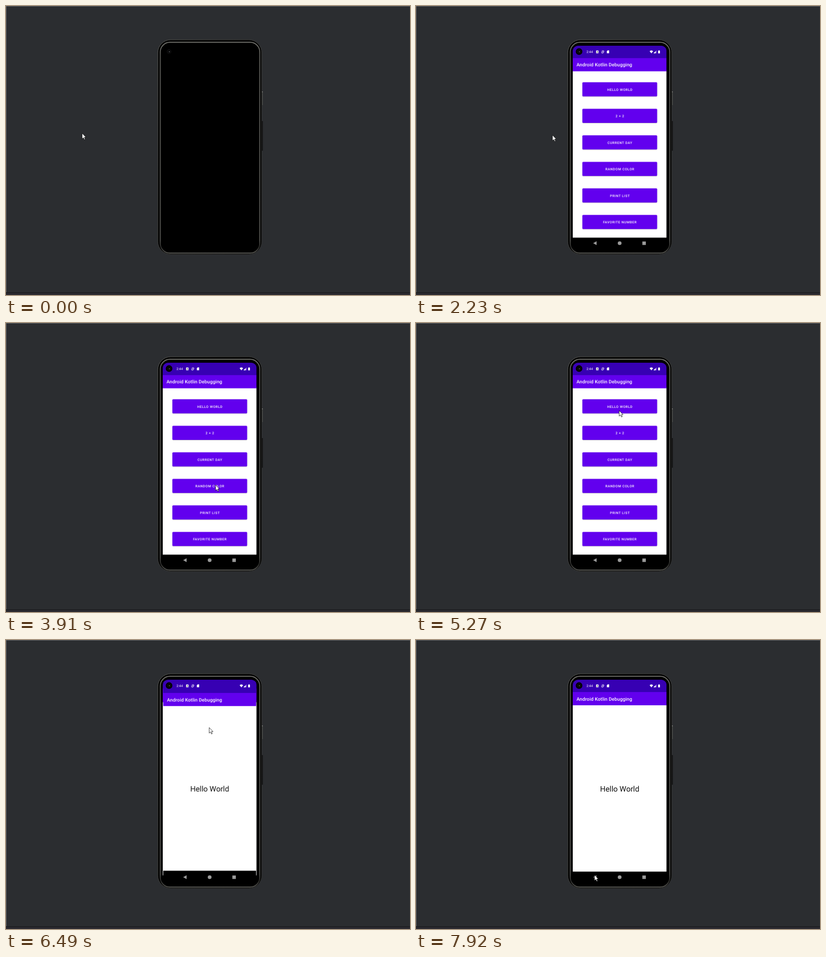
Recreate the animation shown at these times as an HTML page. Size 884 by 633 pixels, loop 8000 ms.

```html
<!DOCTYPE html>
<html lang="en">
<head>
<meta charset="utf-8">
<title>Phone demo</title>
<style>
  html, body { margin: 0; width: 100%; height: 100%; overflow: hidden; background: #2b2d30; }
  svg { display: block; width: 884px; height: 633px; font-family: Roboto, sans-serif; text-rendering: geometricPrecision; }
  .bars, .menu, .hello, .press, .cursor { animation: 8s step-end infinite; }
  .menu, .hello { transform-origin: 445.5px 309px; }
  .title { font-size: 10.43px; font-weight: 500; letter-spacing: .13px; fill: #fff; }
  .label { font-size: 7.3px; font-weight: 500; letter-spacing: .65px; fill: #fff; text-anchor: middle; }

  .bars { animation-name: bars; }
  @keyframes bars { 0% { opacity: 0 } 21%, 100% { opacity: 1 } }

  .menu { animation-name: menu; }
  @keyframes menu {
    0% { opacity: 0; transform: none }
    27.875% { opacity: 1; transform: none }
    76.25% { opacity: 1; transform: scale(1.001) }
    77.875% { opacity: 1; transform: scale(1.002) }
    79.375% { opacity: 1; transform: scale(1.004) }
    81.125% { opacity: 1; transform: scale(1.041) }
    82.625%, 100% { opacity: 0; transform: none }
  }

  .hello { animation-name: hello; }
  @keyframes hello {
    0% { opacity: 0; transform: none }
    81.125% { opacity: 1; transform: scale(.99) }
    82.625% { opacity: 1; transform: scale(.998) }
    84.5%, 100% { opacity: 1; transform: none }
  }

  .press { animation-name: press; }
  @keyframes press { 0% { opacity: 0 } 70.875% { opacity: .2 } 76.25%, 100% { opacity: 0 } }

  .cursor { animation-name: move; }
  @keyframes move {
    0% { transform: translate(166px, 278px); opacity: 1 }
    1.875% { transform: translate(66px, 84px); opacity: 0 }
    24.5% { transform: translate(66px, 84px); opacity: 1 }
    26% { transform: translate(298px, 282px) }
    29.375% { transform: translate(428px, 302px) }
    31% { transform: translate(516px, 305px) }
    34.375% { transform: translate(508px, 262px) }
    35.875% { transform: translate(484px, 176px) }
    37.375% { transform: translate(458px, 100px) }
    39% { transform: translate(449px, 138px) }
    40.5% { transform: translate(456px, 187px) }
    42.375% { transform: translate(459px, 202px) }
    47.25% { transform: translate(459px, 300px) }
    48.875% { transform: translate(458px, 354px) }
    56.625% { transform: translate(450px, 266px) }
    58.25% { transform: translate(439px, 204px) }
    62.125% { transform: translate(440px, 197px) }
    64% { transform: translate(443px, 192px) }
    65.875% { transform: translate(444px, 191px) }
    88% { transform: translate(453px, 244px) }
    89.875% { transform: translate(501px, 453px) }
    93.75% { transform: translate(486px, 502px) }
    95.625% { transform: translate(475px, 527px) }
    97.5% { transform: translate(428px, 521px) }
    99%, 100% { transform: translate(390px, 514px); opacity: 1 }
  }
</style>
</head>
<body>
<svg viewBox="0 0 884 633">
  <defs>
    <linearGradient id="rim" x1="0" y1="0" x2="1" y2="1">
      <stop offset="0" stop-color="#5a5a55"/>
      <stop offset=".3" stop-color="#454541"/>
      <stop offset="1" stop-color="#30302e"/>
    </linearGradient>
    <linearGradient id="sheen" x1="0" y1="0" x2="0" y2="1">
      <stop offset="0" stop-color="#75756f"/>
      <stop offset=".06" stop-color="#585854"/>
      <stop offset=".94" stop-color="#50504c"/>
      <stop offset=".97" stop-color="#2c2c2a"/>
      <stop offset="1" stop-color="#555551"/>
    </linearGradient>
    <clipPath id="screen"><rect x="343" y="87" width="205.3" height="445" rx="12"/></clipPath>
    <g id="window">
      <rect x="343" y="87" width="205.3" height="445"/>
      <rect x="343" y="140" width="205.3" height="367.3" fill="#fff"/>
      <rect x="343" y="87" width="205.3" height="27.5" fill="#3700b3"/>
      <rect x="343" y="114" width="205.3" height="29" fill="#6200ee"/>
      <text class="title" x="351.2" y="132.5">Android Kotlin Debugging</text>
    </g>
  </defs>

  <rect width="884" height="633" fill="#2b2d30"/>
  <rect y="627" width="884" height="2" fill="#1e1f22"/>
  <rect y="629" width="884" height="4" fill="#2b2a30"/>
  <path d="M0 .5H884M.5 0V627" stroke="#6c6d6f" fill="none"/>

  <path d="M561.4 187V217" stroke="#555551"/>
  <path d="M561 187V189" stroke="#a0a09c"/>
  <path d="M561 252V317" stroke="#000" stroke-width="1.4"/>
  <rect x="332.2" y="74" width="227.4" height="470" rx="28" fill="#040404" stroke="url(#rim)"/>
  <rect x="337.6" y="79.5" width="217.6" height="461.6" rx="21" fill="#000" stroke="url(#sheen)" stroke-width="2.1"/>

  <g clip-path="url(#screen)">
    <g class="menu">
      <use href="#window"/>
      <g id="buttons"></g>
      <rect class="press" x="364" y="167" width="163.7" height="31" rx="2" fill="#fff"/>
    </g>
    <g class="hello">
      <use href="#window"/>
      <text x="445.7" y="331.6" font-size="16.7" text-anchor="middle" fill="#111">Hello World</text>
    </g>
  </g>

  <circle cx="356.8" cy="99.8" r="7.2" fill="#000"/>
  <circle cx="356.8" cy="99.8" r="4.5" fill="#060607" stroke="#131314"/>
  <circle cx="357.5" cy="100.2" r="1" fill="#707478"/>

  <g class="bars" fill="#fff">
    <text x="373" y="103.4" font-size="7.3">2:44</text>
    <rect x="394" y="97.5" width="5.4" height="6" rx=".6"/>
    <path d="M395.4 102.2L396.8 99.2L398.2 102.2" stroke="#222" stroke-width=".8" fill="none"/>
    <path d="M406.6 98H411V101.5M406.3 100H409.5V103.2H406.3Z" stroke="#fff" stroke-width=".9" fill="none"/>
    <path d="M417.6 99.2L419.2 97.3H422.6V103.6H417.6Z"/>
    <path d="M511.2 99Q515 95.3 518.8 99L515 103.8Z"/>
    <path d="M519.8 103.6L526.2 97.2V103.6Z" opacity=".55"/>
    <path d="M519.8 103.6L524 99.4V103.6Z"/>
    <path d="M529.8 98H531V97.1H532.6V98H533.8V103.7H529.8Z"/>
    <g fill="#9b9b9b">
      <path d="M387.7 519.5L395.2 515.2V523.8Z"/>
      <circle cx="445.6" cy="519.5" r="4.1"/>
      <rect x="495.3" y="515.8" width="7.6" height="7.6"/>
    </g>
  </g>

  <path class="cursor" d="M.6 .8V13L3.5 10.4L5.5 14.9L7.4 14.1L5.5 9.7H9.1Z" fill="#fff" stroke="#000" stroke-width=".8"/>
</svg>
<script>
  const labels = ["HELLO WORLD", "2 + 2", "CURRENT DAY", "RANDOM COLOR", "PRINT LIST", "FAVORITE NUMBER"];
  const button = (label, i) => {
    const y = 167 + i * 58.1;
    return `<rect x="364" y="${y + 1}" width="163.7" height="31" rx="2" fill="#000" opacity=".22"/>
      <rect x="364" y="${y}" width="163.7" height="31" rx="2" fill="#6200ee"/>
      <text class="label" x="446.2" y="${y + 18.6}">${label}</text>`;
  };
  document.getElementById("buttons").innerHTML = labels.map(button).join("");
</script>
</body>
</html>
```
